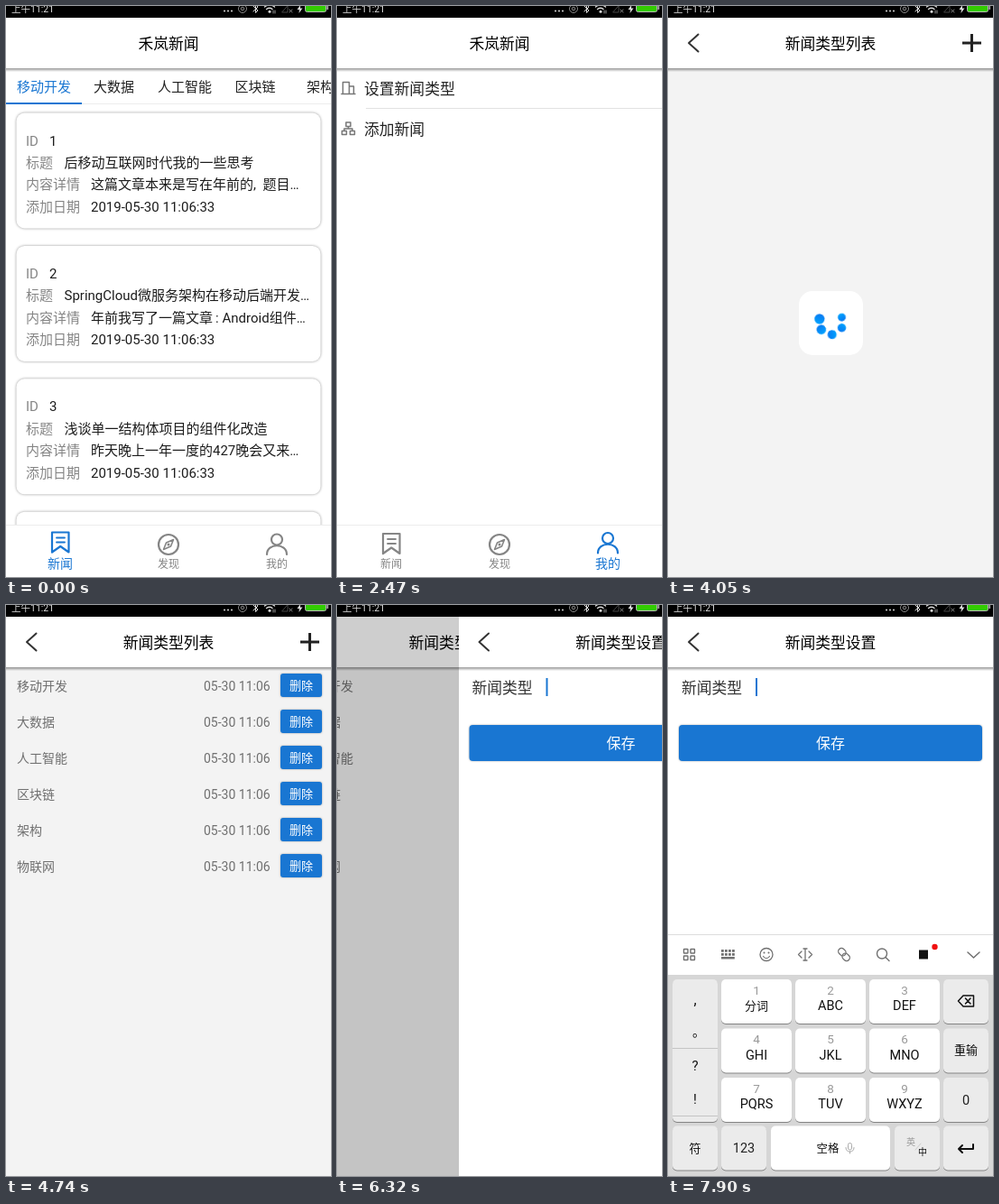
Write an HTML page that moves like this. It is 360 by 633 pixels and loops after 8 s.

```html
<!DOCTYPE html>
<html lang="zh-CN">
<head>
<meta charset="utf-8">
<title>新闻</title>
<style>
html, body { margin: 0; width: 100%; height: 100%; overflow: hidden; background: #fff; }
svg { display: block; width: 100vw; height: 100vh; }
text { font-family: Roboto, "Noto Sans CJK SC", "Noto Sans CJK", sans-serif; white-space: pre; }
.card { filter: drop-shadow(0 .8px 1.4px rgba(0,0,0,.42)); }
.button { filter: drop-shadow(0 .8px 1px rgba(0,0,0,.3)); }
.key { filter: drop-shadow(0 1px .5px rgba(0,0,0,.38)); }
.line { fill: none; stroke-linecap: round; stroke-linejoin: round; }

#news, #me, #list, #loader, #caret, #home, #types, #form, #board,
.dim, .ripple, .dot { animation: 8s linear infinite; }

#news { animation-name: leave; animation-timing-function: step-end; }
#me { animation-name: enter; animation-timing-function: step-end; }
@keyframes leave { 0% { visibility: visible } 11.875%, 100% { visibility: hidden } }
@keyframes enter { 0% { visibility: hidden } 11.875%, 100% { visibility: visible } }

.ripple { transform-box: fill-box; transform-origin: center; opacity: 0; }
#tap1 { animation-name: tap1; }
#tap2 { animation-name: tap2; }
@keyframes tap1 {
  0%, 10.6% { transform: scale(.2); opacity: 0 }
  10.65% { transform: scale(.2); opacity: .1 }
  15% { transform: scale(1); opacity: .08 }
  18.375%, 100% { transform: scale(1); opacity: 0 }
}
@keyframes tap2 {
  0%, 71.2% { transform: scale(.3); opacity: 0 }
  71.25% { transform: scale(.3); opacity: .1 }
  73.5%, 76% { transform: scale(1); opacity: .1 }
  82%, 100% { transform: scale(1); opacity: 0 }
}

#home { animation-name: home; }
@keyframes home {
  0%, 31.25% { transform: translateX(0) }
  34.75%, 100% { transform: translateX(-75px) }
}
#dim1 { animation-name: dim1; }
@keyframes dim1 { 0%, 31.25% { opacity: 0 } 34.75%, 100% { opacity: .3 } }

#types { animation-name: types; }
@keyframes types {
  0%, 31.25% { transform: translateX(360px) }
  34.75%, 72.5% { transform: translateX(0) }
  73.75% { transform: translateX(-9px) }
  79% { transform: translateX(-50px) }
  82.375%, 100% { transform: translateX(-78px) }
}
#dim2 { animation-name: dim2; }
@keyframes dim2 {
  0%, 72.5% { opacity: 0 }
  73.75% { opacity: .015 }
  79% { opacity: .19 }
  82.375%, 100% { opacity: .3 }
}
#form { animation-name: form; }
@keyframes form {
  0%, 72.5% { transform: translateX(360px) }
  73.75% { transform: translateX(316px) }
  79% { transform: translateX(135px) }
  82.375%, 100% { transform: translateX(0) }
}

#loader { animation-name: loader; animation-timing-function: step-end; }
#list { animation-name: list; animation-timing-function: step-end; }
@keyframes loader { 0% { visibility: visible } 59.25%, 100% { visibility: hidden } }
@keyframes list { 0% { visibility: hidden } 59.25%, 100% { visibility: visible } }

.dot {
  animation-name: orbit;
  animation-timing-function: cubic-bezier(.364,0,.636,1);
  transform-origin: 180.5px 351px;
}
@keyframes orbit {
  0%, 35.775% { transform: rotate(0) }
  42.325%, 46.025% { transform: rotate(360deg) }
  52.575%, 100% { transform: rotate(720deg) }
}

#caret { animation-name: caret; animation-timing-function: step-end; }
@keyframes caret {
  0% { visibility: visible }
  84.875% { visibility: hidden }
  91.25%, 100% { visibility: visible }
}
#board { animation-name: board; }
@keyframes board {
  0%, 91.2% { transform: translateY(270px); animation-timing-function: cubic-bezier(.25,.5,.35,1) }
  98.5%, 100% { transform: translateY(0) }
}
</style>
</head>
<body>
<svg id="stage" viewBox="0 0 360 633" preserveAspectRatio="none"></svg>
<script>
const BLUE = '#1976d2', GRAY = '#858585', INK = '#1c1c1c', PAGE = '#f3f3f3';

// y is the optical middle of the line
const text = (x, y, size, fill, s, anchor = 'start') =>
  `<text x="${x}" y="${y + size * .37}" font-size="${size}" fill="${fill}" text-anchor="${anchor}">${s}</text>`;
const mid = (x, y, size, fill, s) => text(x, y, size, fill, s, 'middle');
const rect = (x, y, w, h, fill, r = 0, more = '') =>
  `<rect x="${x}" y="${y}" width="${w}" height="${h}" rx="${r}" fill="${fill}" ${more}/>`;
const line = (d, color, w = 1.5) =>
  `<path class="line" d="${d}" stroke="${color}" stroke-width="${w}"/>`;
const disc = (x, y, r, fill, more = '') => `<circle cx="${x}" cy="${y}" r="${r}" fill="${fill}" ${more}/>`;
const ring = (x, y, r, color, w = 1.5) => disc(x, y, r, 'none', `stroke="${color}" stroke-width="${w}"`);
const group = (id, ...parts) => `<g id="${id}">${parts.join('')}</g>`;
const dim = id => rect(0, 13, 360, 620, '#000', 0, `id="${id}" class="dim"`);

const header = (title, back) =>
  rect(0, 69, 360, 4, 'url(#shade)') + rect(0, 13, 360, 56, '#fff') +
  mid(180, 41.5, 16.8, '#000', title) +
  (back ? line('M33.500 31.500L23 41L33.500 50.500', '#333', 2) : '');

function status() {
  return rect(0, 0, 360, 13, '#000') +
    text(6, 3.5, 10.5, '#ddd', '上午11:21') +
    [242, 246, 250].map(x => disc(x, 5.5, 1, '#ddd')).join('') +
    ring(262, 3, 4.5, '#888', 1) + ring(262, 3, 1.8, '#888', 1) +
    line('M274 0L279 5L276.500 7.500V-2L279 1L274 6', '#ddd', 1) +
    line('M286.500 1Q292 -3 297.500 1M288.500 3.500Q292 1 295 3.500', '#ddd', 1.3) +
    disc(292, 6.2, 1.5, '#ddd') + line('M296 5V8M298 5V8', '#bbb', .8) +
    line('M306 7H312V0Z', '#444', 1) + line('M314 4L317 7M317 4L314 7', '#999', .9) +
    `<path d="M326 -1L322.500 4H325L324.500 8L328.500 2.500H326Z" fill="#ddd"/>` +
    rect(331.5, -3, 23, 9.5, '#3c0', 2, 'stroke="#bbb" stroke-width="1"') +
    rect(355.5, 0, 1.5, 4, '#bbb');
}

function nav(selected) {
  const icons = [
    c => line('M51 585H69.500V607L60.250 600.500L51 607Z', c, 2.2) + line('M56 591H65M56 596H65', c, 1.8),
    c => ring(180, 597, 11, c, 2.2) + line('M185.500 591.500L182.500 599L174.500 602.500L177.500 595Z', c, 1.6) + disc(180, 597, 1.5, c),
    c => ring(300, 591.5, 6, c, 2.2) + line('M289 608C289 595 311 595 311 608', c, 2.2)
  ];
  return rect(0, 575, 360, 58, '#fff') + rect(0, 575, 360, 1, '#ececec') +
    ['新闻', '发现', '我的'].map((name, i) => {
      const on = i === selected, c = on ? BLUE : GRAY, x = 60 + 120 * i;
      return `<g transform="translate(0 ${on ? -1.5 : 0})">${icons[i](c)}</g>` +
        mid(x, on ? 618 : 619, on ? 14 : 12, c, name);
    }).join('');
}

function card([title, detail], i) {
  const top = 118.5 + 147.4 * i;
  const rows = [['ID', i + 1, 48], ['标题', title, 64.5], ['内容详情', detail, 94], ['添加日期', '2019-05-30 11:06:33', 94]];
  return rect(11.5, top, 337, 128, '#fff', 9, 'class="card"') +
    rows.map(([label, value, x], k) => {
      const y = top + 30.5 + 24.4 * k;
      return text(22, y, 15, GRAY, label) + text(x, y, 15, INK, value);
    }).join('');
}

function news() {
  const tabs = [[12, '移动开发'], [97, '大数据'], [168, '人工智能'], [253.5, '区块链'], [333, '架构']];
  const cards = [
    ['后移动互联网时代我的一些思考', '这篇文章本来是写在年前的,\u2002题目…'],
    ['SpringCloud微服务架构在移动后端开发…', '年前我写了一篇文章\u2009:\u2005Android组件…'],
    ['浅谈单一结构体项目的组件化改造', '昨天晚上一年一度的427晚会又来…'],
    ['', '']
  ];
  return tabs.map(([x, s], i) => text(x, 89.5, 15, i ? '#222' : BLUE, s)).join('') +
    rect(0, 108, 360, 1, '#ececec') + rect(0, 107, 84, 2, BLUE) +
    cards.map(card).join('') + nav(0);
}

function me() {
  return line('M6.500 97V84.500H13.500V97M13.500 89H18.500V97M5 97.500H20', '#777') +
    text(30, 91.5, 16.8, '#222', '设置新闻类型') +
    rect(32, 113, 328, 1, '#e2e2e2') +
    line('M10 129H15V133.500H10ZM5.500 138.500H10.500V142.500H5.500ZM14.500 138.500H19.500V142.500H14.500ZM12.500 133.500V136M8 138.500V136H17V138.500', '#777') +
    text(30, 136.5, 16.8, '#222', '添加新闻') + nav(2);
}

function loader() {
  const dots = [0, 1, 2, 3, 4].map(i =>
    disc(180.5, 337.7, 5.6 - .3 * i, 'url(#glow)', `class="dot" style="animation-delay:${56 * i}ms"`)).reverse();
  return rect(145, 316, 71, 71, '#fff', 15) + dots.join('');
}

function list() {
  return ['移动开发', '大数据', '人工智能', '区块链', '架构', '物联网'].map((name, i) => {
    const y = 89.5 + 40 * i;
    return text(12, y, 14, '#707070', name) + text(219, y, 14, '#707070', '05-30 11:06') +
      rect(304, y - 13.5, 46, 26, BLUE, 3, 'class="button"') + mid(327, y, 13, '#fff', '删除');
  }).join('');
}

function form() {
  return rect(0, 13, 360, 620, '#fff') + header('新闻类型设置', true) +
    text(15, 91.5, 16.8, '#333', '新闻类型') +
    rect(97, 81, 2, 20, BLUE, 0, 'id="caret"') +
    rect(12, 133, 336, 40, BLUE, 4, 'class="button"') + mid(180, 153, 16, '#fff', '保存');
}

function tools() {
  const c = '#707070', cells = [0, 1, 2, 3], y = 387.5;
  const link = x => rect(x, y - 4 + (x - 187) / 7, 9, 7, 'none', 3.5, `stroke="${c}" stroke-width="1.3"`);
  return cells.map(i => rect(17.5 + 7.5 * (i % 2), 381.5 + 7.5 * (i >> 1), 4.5, 4.5, 'none', .5, `stroke="${c}" stroke-width="1.4"`)).join('') +
    cells.map(i => rect(59 + 4 * i, 382, 2.8, 2.8, c) + rect(59 + 4 * i, 386, 2.8, 2.8, c)).join('') +
    rect(59, 390, 14.8, 2.5, c) +
    ring(109, y, 7, c, 1.3) + disc(106.5, 385.5, 1, c) + disc(111.5, 385.5, 1, c) + line('M105.500 389.500Q109 394 112.500 389.500', c, 1.2) +
    line('M150 381H154M152 381V394M150 394H154M148 384L144.500 387.500L148 391M156 384L159.500 387.500L156 391', c, 1.3) +
    `<g transform="rotate(45 195 ${y})">${link(187)}${link(194)}</g>` +
    ring(237, 386.5, 5.5, c, 1.4) + line('M241 390.500L245 394.500', c, 1.4) +
    rect(278, 382.5, 10, 10, '#111') + disc(295.5, 379, 3.2, '#f01010') +
    line('M332 385L338.500 391L345 385', c, 1.5);
}

function board() {
  const key = (x, y, w, h, fill = '#fff') => rect(x, y, w, h, fill, 5, 'class="key"');
  const soft = '#ebebeb', rows = [415, 469.5, 524];
  const keys = ['分词', 'ABC', 'DEF', 'GHI', 'JKL', 'MNO', 'PQRS', 'TUV', 'WXYZ'].map((s, i) => {
    const x = 59 + 82 * (i % 3), y = rows[Math.floor(i / 3)];
    return key(x, y, 78, 49) + mid(x + 39, y + 12, 13.5, '#999', i + 1) +
      mid(x + 39, y + 29, i ? 14.5 : 13, '#111', s);
  }).join('');
  return rect(0, 365, 360, 268, '#fff') + rect(0, 365, 360, 1, '#ddd') + tools() +
    rect(0, 410, 360, 223, '#d6d6d6') +
    key(5, 415, 50, 158, soft) + rect(5, 491, 50, 1, '#c4c4c4') + rect(5, 566, 50, 1, '#c4c4c4') +
    mid(30, 437, 16, '#111', ',') + mid(34, 473, 14, '#111', '。') +
    mid(30, 510, 15, '#111', '?') + mid(30, 547, 15, '#111', '!') + keys +
    rows.map(y => key(305, y, 50, 49, soft)).join('') +
    line('M321.500 439L327 433H338.500V445H327ZM329.500 436L335 442M335 436L329.500 442', '#111', 1.5) +
    mid(330, 493.5, 13, '#111', '重输') + mid(330, 548.5, 14.5, '#222', '0') +
    [5, 59, 251, 305].map(x => key(x, 577.5, 50, 49, soft)).join('') + key(114, 577.5, 132, 49) +
    mid(30, 602, 13, '#111', '符') + mid(84, 602, 14.5, '#222', '123') + mid(177, 602, 12.5, '#111', '空格') +
    rect(199.5, 596.5, 4, 7.5, 'none', 2, 'stroke="#aaa"') + line('M197 601.500Q197 606 201.500 606Q206 606 206 601.500M201.500 606V608', '#aaa', 1) +
    mid(269, 595, 10, '#999', '英') + line('M274 604L280 597', '#ccc', 1) + mid(282, 606.5, 10, '#111', '中') +
    line('M338 598V603H322M326 599L322 603L326 607', '#111', 2);
}

const defs = `<defs>
  <linearGradient id="glow"><stop stop-color="#00a2ff"/><stop offset="1" stop-color="#0a78f0"/></linearGradient>
  <linearGradient id="shade" x2="0" y2="1"><stop stop-opacity=".4"/><stop offset="1" stop-opacity="0"/></linearGradient>
</defs>`;

document.getElementById('stage').innerHTML = defs +
  group('home',
    rect(0, 13, 360, 620, '#fff'), group('news', news()), group('me', me()),
    header('禾岚新闻'), disc(300, 604, 46, '#000', 'id="tap1" class="ripple"'), dim('dim1')) +
  group('types',
    rect(0, 13, 360, 620, PAGE), header('新闻类型列表', true),
    disc(336.5, 41, 20, '#000', 'id="tap2" class="ripple"'),
    rect(326, 39.5, 21, 3, '#222'), rect(335, 31, 3, 20, '#222'),
    group('loader', loader()), group('list', list()), dim('dim2')) +
  group('form', form()) + group('board', board()) + status();
</script>
</body>
</html>
```
